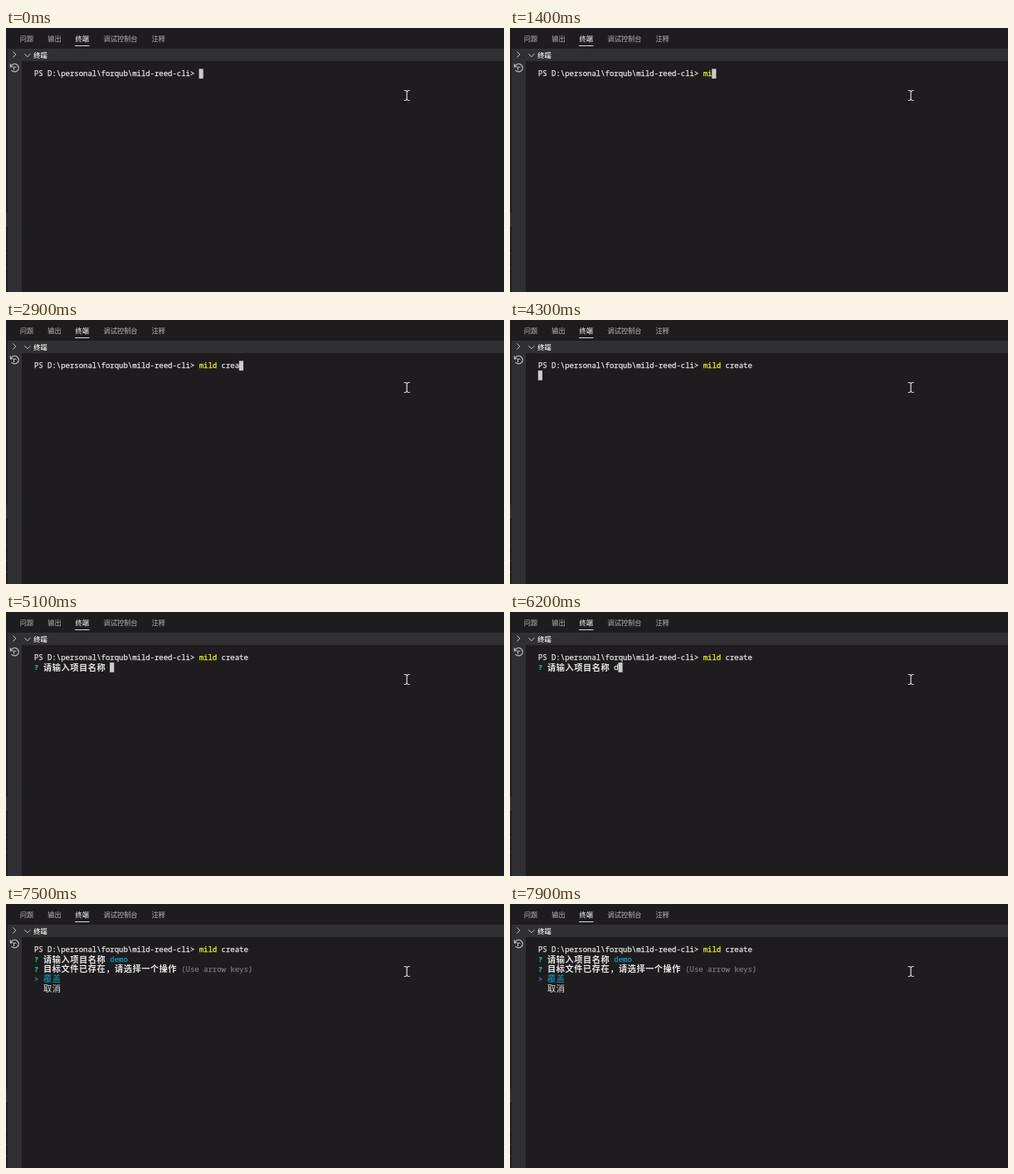
Write an HTML page with a canvas that moves like this. It is 600 by 319 pixels and loops after 8 s.

```html
<!DOCTYPE html>
<html lang="zh-CN">
<head>
<meta charset="utf-8">
<title>Terminal</title>
<style>
  html, body { margin: 0; width: 100%; height: 100%; overflow: hidden; background: #1e1c1e; }
  canvas { display: block; width: 600px; height: 319px; }
</style>
</head>
<body>
<canvas id="stage"></canvas>
<script>
const W = 600, H = 319, LOOP = 8000;
const canvas = document.getElementById('stage');
const ctx = canvas.getContext('2d');
const dpr = window.devicePixelRatio || 1;
canvas.width = W * dpr;
canvas.height = H * dpr;
ctx.scale(dpr, dpr);

const SANS = '"Noto Sans CJK SC", "Noto Sans CJK", sans-serif';
const MONO = '"Noto Sans Mono", "DejaVu Sans Mono", monospace';
const CELL = 5.37, LINE = 11.7, LEFT = 34, TOP = 49.4;

const C = {
  bg: '#1e1c1e', bar: '#302f31', text: '#e6e6e4', dim: '#757575', tab: '#a09fa0',
  green: '#10b878', cyan: '#149cc4', yellow: '#f5f524', block: '#cccccc', icon: '#cacaca', pointer: '#e0e0e0'
};

const PROMPT = 'PS D:\\personal\\forqub\\mild-reed-cli> ';
const COMMAND = 'mild create';
const NAME = 'demo';
// Time of each key press
const COMMAND_KEYS = [1000, 1400, 1600, 1700, 1900, 2300, 2600, 2700, 2900, 3200, 3400];
const NAME_KEYS = [6200, 6300, 6500, 6600];
const ENTER = 4300, ASK = 5100, CONFIRM = 7500;

const typed = (text, keys, t) => text.slice(0, keys.filter(k => k <= t).length);

function rect(x, y, w, h, color) {
  ctx.fillStyle = color;
  ctx.fillRect(x, y, w, h);
}

// An outline thickens the thin strokes of small type
function label(text, x, y, color, font, outline = 0) {
  ctx.font = font;
  ctx.fillStyle = color;
  ctx.fillText(text, x, y);
  if (!outline) return;
  ctx.strokeStyle = color;
  ctx.lineWidth = outline;
  ctx.strokeText(text, x, y);
}

function path(points, color, width) {
  ctx.strokeStyle = color;
  ctx.lineWidth = width;
  ctx.beginPath();
  points.forEach(([x, y], i) => i ? ctx.lineTo(x, y) : ctx.moveTo(x, y));
  ctx.stroke();
}

// Writes on the terminal grid, wide characters take two cells; returns the next column
function put(text, row, col, color, bold) {
  const y = TOP + row * LINE + 9;
  const weight = bold ? 700 : 400;
  for (const ch of text) {
    const x = LEFT + col * CELL;
    const wide = ch.codePointAt(0) > 0x2e7f;
    if (wide) label(ch, x + 0.25, y + 0.4, color, `${weight} 10.2px ${SANS}`);
    else label(ch, x, y, color, `${weight} 8.95px ${MONO}`, 0.25);
    col += wide ? 2 : 1;
  }
  return col;
}

function cursor(row, col) {
  rect(LEFT + col * CELL - 0.2, TOP + row * LINE, CELL - 0.2, LINE, C.block);
}

function drawPanel() {
  rect(0, 0, W, H, C.bg);
  rect(2, 25, W - 2, 15, C.bar);
  rect(2, 25, 17, H - 25, C.bar);
  rect(0, 223, 1.5, 17, '#353436');
  for (const y of [272, 290, 304]) rect(0, y, 1.5, 1, '#353436');

  const tabs = [['问题', 16.7], ['输出', 50.2], ['终端', 83.6], ['调试控制台', 117.6], ['注释', 175.4]];
  tabs.forEach(([name, x], i) => label(name, x, 16.2, i === 2 ? '#e4e4e4' : C.tab, `8.2px ${SANS}`, 0.12));
  rect(83, 21, 17.5, 1, '#d8d8d8');
  label('终端', 33.3, 36.2, '#dcdcdc', `700 8.2px ${SANS}`);

  path([[8.4, 28.6], [11.9, 32], [8.4, 35.4]], C.icon, 1);
  path([[22.4, 31.2], [26, 34.8], [29.6, 31.2]], C.icon, 1);
  drawHistoryIcon();
}

function drawHistoryIcon() {
  ctx.strokeStyle = C.icon;
  ctx.lineWidth = 1.1;
  ctx.beginPath();
  ctx.arc(10.4, 48.1, 4.8, -2.75, 2.5);
  ctx.stroke();
  path([[5.1, 43.4], [5.4, 46.9], [8.7, 46.7]], C.icon, 1.1);
  path([[9.5, 50.9], [9.5, 47.2], [12.4, 47.2]], C.icon, 1);
}

function drawPointer() {
  const x = 483, top = 75.5, bottom = 87.5;
  path([[x, top + 1.2], [x, bottom - 1.2]], C.pointer, 1.2);
  for (const side of [-1, 1]) {
    path([[x + side * 3.5, top], [x + side, top + 0.2], [x, top + 1.4]], C.pointer, 1.1);
    path([[x + side * 3.5, bottom], [x + side, bottom - 0.2], [x, bottom - 1.4]], C.pointer, 1.1);
  }
}

function ask(row, question) {
  put('?', row, 0, C.green, true);
  return put(question, row, 2, C.text, true) + 1;
}

function drawTerminal(t) {
  let col = put(PROMPT, 0, 0, C.text);
  const command = typed(COMMAND, COMMAND_KEYS, t);
  col = put(command.slice(0, 4), 0, col, C.yellow);
  col = put(command.slice(4), 0, col, C.text);
  if (t < ENTER) return cursor(0, col);
  if (t < ASK) return cursor(1, 0);

  col = ask(1, '请输入项目名称');
  const done = t >= CONFIRM;
  col = put(typed(NAME, NAME_KEYS, t), 1, col, done ? C.cyan : C.text);
  if (!done) return cursor(1, col);

  col = ask(2, '目标文件已存在，请选择一个操作');
  put('(Use arrow keys)', 2, col, C.dim);
  put('>', 3, 0, C.cyan);
  put('覆盖', 3, 2, C.cyan);
  put('取消', 4, 2, C.text);
}

function frame() {
  drawPanel();
  drawTerminal(performance.now() % LOOP);
  drawPointer();
  requestAnimationFrame(frame);
}
frame();
</script>
</body>
</html>
```
